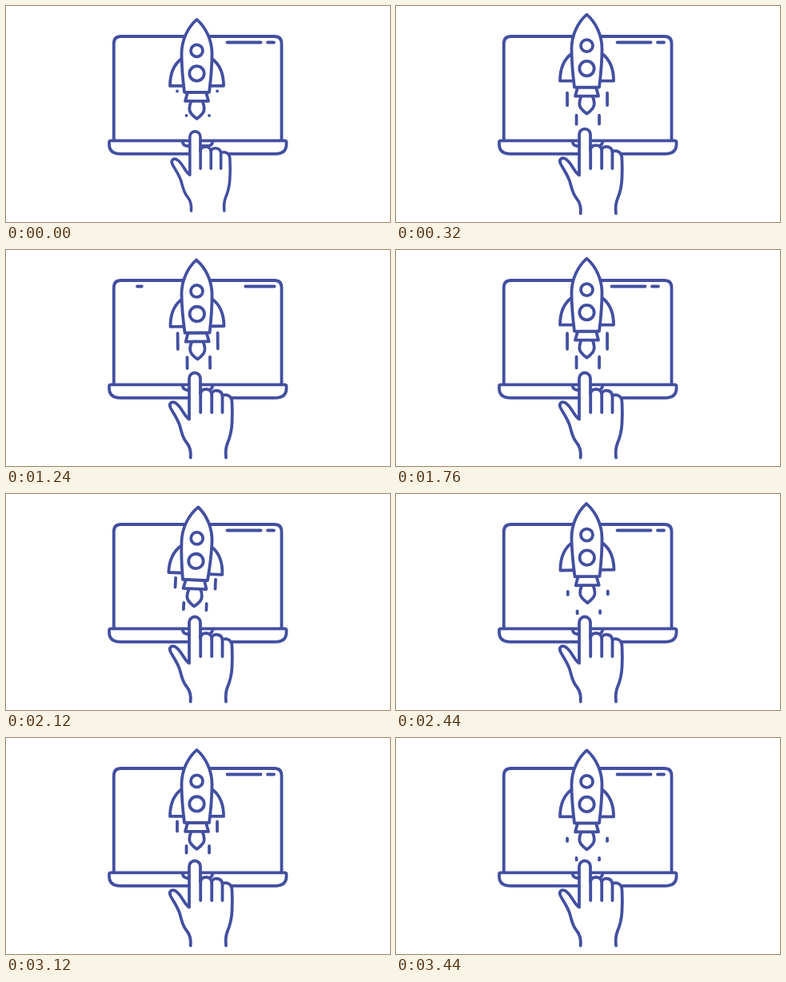
These frames come from a looping animation (480x270 px, 3.48 s). An HTML page:

```html
<!DOCTYPE html>
<html lang="en">
<head>
<meta charset="utf-8">
<title>Launch</title>
<style>
  html, body { margin: 0; width: 100%; height: 100%; overflow: hidden; background: #fff; }
  svg { display: block; width: 100vw; height: 100vh; }
  .ink { fill: #fff; stroke: #434fa0; stroke-width: 3.8; stroke-linecap: round; stroke-linejoin: round; }
  .line { fill: none; }
</style>
</head>
<body>
<svg viewBox="0 0 480 270">
  <g class="ink">
    <path d="M134.8 168V47q0-9 9-9H335.500q9 0 9 9V168"/>
    <path id="bar" class="line" d="M164 45.500H335.500"/>
    <path d="M131 168.300H348.500q2 0 2 2v2.500q0 12-14 12H143q-14 0-14-12v-2.500q0-2 2-2z"/>
    <path class="line" d="M220.500 169q1 6 6 6h26q5 0 6-6"/>

    <g id="rocket">
      <g id="trails" class="line"></g>
      <path d="M219.500 66C210 73 205 85 205 100H223M257.500 66C267 73 272 85 272 100H254"/>
      <path d="M231.500 119C229 125 228 130 231 134Q234 138 238.500 141Q243 138 246 134C249 130 248 125 245.500 119"/>
      <path d="M227 108L224 119H253L250 108z"/>
      <path d="M238.500 17C227 27 219.500 43 219.500 60C219.500 78 221 92 223 108H254C256 92 257.500 78 257.500 60C257.500 43 250 27 238.500 17z"/>
      <circle cx="238.500" cy="56" r="7.500"/>
      <circle cx="238.500" cy="84.500" r="9.200"/>
    </g>

    <g id="hand">
      <path d="M230.700 259.500C231.500 251 230 246 226 241C220 234 220 228 217 219C214 210 209 204 205.500 197C203 191 208 188 213 192C220 197 222 207 229 211.500V160.500a7 7 0 0 1 14 0V180c1-8 13-8 14.200 0c1-6 12-6 13.300 2c4-2 11.500-1 12 8C283 200 283 208 282.500 216C282 228 280 234 277 241C275 246 274 251 275 259.500"/>
      <path class="line" d="M243.200 178V203M257.200 179V203M270.500 181V203"/>
    </g>
  </g>
</svg>
<script>
const LOOP = 3480, TRAIL_CYCLES = 7, STEP = 40;
const BAR_TRAVEL = 188, BAR_START = 1060, BAR_TIME = 800;
const lift = [0, -5, -1.5, -6, -3, -0.5, -2, -4.5, -6.5, -2, -4, -1.5];
const tilt = [0, -0.7, 0, -2, 0.3, 2.5];
const streaks = [[214, 106.5, 130.5], [264, 106.5, 130.5], [225.5, 137, 154], [254, 137, 154]];

const $ = id => document.getElementById(id);
const clamp = v => Math.min(1, Math.max(0, v));
const mix = (a, b, p) => a + (b - a) * p;

// Linear interpolation through a repeating list of poses
function sample(poses, t) {
  const k = t / STEP, i = Math.floor(k), n = poses.length;
  return mix(poses[i % n], poses[(i + 1) % n], k - i);
}

const trails = streaks.map(() => {
  const path = document.createElementNS("http://www.w3.org/2000/svg", "path");
  return $("trails").appendChild(path);
});

function draw(t) {
  $("rocket").setAttribute("transform",
    `translate(0 ${sample(lift, t)}) rotate(${sample(tilt, t)} 238.500 60)`);

  const phase = t * TRAIL_CYCLES / LOOP % 1;
  const head = clamp(phase / 0.55), tail = clamp((phase - 0.45) / 0.55);
  streaks.forEach(([x, top, bottom], i) =>
    trails[i].setAttribute("d", `M${x} ${mix(top, bottom, tail)}V${mix(top, bottom, head) + 0.01}`));

  const p = clamp((t - BAR_START) / BAR_TIME);
  const shift = BAR_TRAVEL * (1 - Math.cos(Math.PI * p)) / 2;
  $("bar").setAttribute("stroke-dasharray", `42 8.500 8 ${BAR_TRAVEL - 58.5}`);
  $("bar").setAttribute("stroke-dashoffset", -(112.5 + shift));

  const scale = 1 - 0.065 * (1 - clamp(t / 400)) ** 2;
  $("hand").setAttribute("transform", `translate(242 206) scale(${scale}) translate(-242 -206)`);
}

const start = performance.now();
function tick() {
  draw((performance.now() - start) % LOOP);
  requestAnimationFrame(tick);
}
tick();
</script>
</body>
</html>
```
